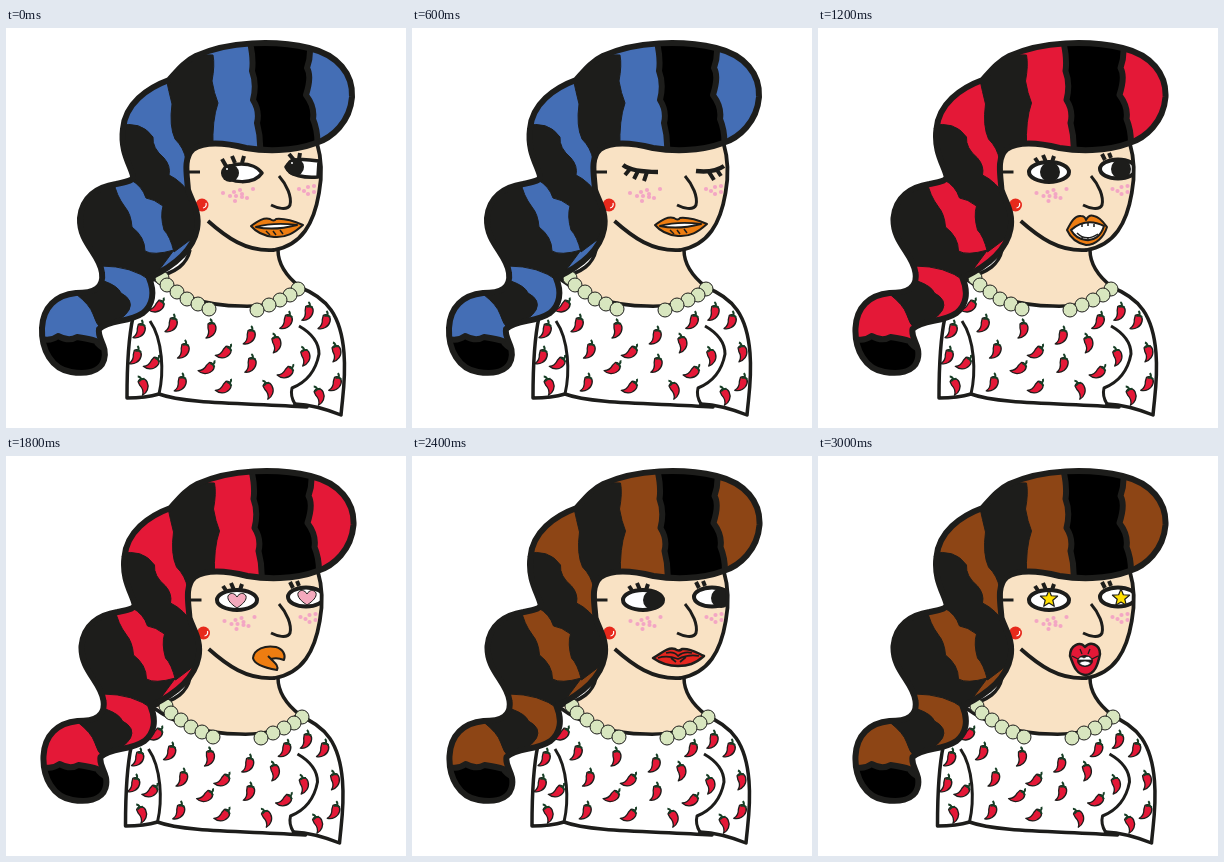
These frames come from a looping animation (400x400 px, 3600 ms). An HTML page:

```html
<!DOCTYPE html>
<html lang="en">
<head>
<meta charset="utf-8">
<title>Chili girl</title>
<style>
  html, body { margin: 0; width: 100%; height: 100%; overflow: hidden; background: #fff; }
  svg { display: block; width: 400px; height: 400px; }
</style>
</head>
<body>
<svg id="stage" viewBox="0 0 400 400"></svg>
<script>
const INK = '#1d1d1b', SKIN = '#f9e2c4', RED = '#e41837', ORANGE = '#ee7d11';
const BLUE = '#446eb5', BROWN = '#8d4515';

const path = (d, fill = 'none', width = 3, stroke = INK) =>
  `<path d="${d}" fill="${fill}" stroke="${stroke}" stroke-width="${width}"/>`;
const oval = (x, y, rx, ry, fill, width = 0) =>
  `<ellipse cx="${x}" cy="${y}" rx="${rx}" ry="${ry}" fill="${fill}" stroke="${INK}" stroke-width="${width}"/>`;
const dots = (points, r, fill, width) => points.map(([x, y]) => oval(x, y, r, r, fill, width)).join('');
const move = (x, y, body, angle = 0) => `<g transform="translate(${x} ${y}) rotate(${angle})">${body}</g>`;

// Hair
const HAIR = `M163 52C172 42 178 34 190 28C222 13 270 12 303 20C332 27 347 46 346 69
  C344 94 326 110 310 115C286 124 258 123 240 120C220 115 199 113 187 121
  C177 130 181 147 182 162C186 174 194 184 191 201C187 223 166 239 143 250
  C149 264 147 277 137 285C122 295 104 291 93 301C91 311 102 318 98 332
  C94 345 78 346 65 344C46 341 35 322 36 300C37 279 50 267 70 265
  C88 265 98 260 96 245C94 226 73 215 74 190C76 169 91 159 110 156
  C119 154 128 153 127 148C125 138 114 124 117 101C119 76 141 60 163 52Z`;
const STRIPES = [
  'M160 50Q180 25 207 27Q209 37 206 53Q208 65 212 75Q206 92 207 120L180 132Q178 120 169 111Q163 98 166 76Q163 64 160 50Z',
  'M112 98Q135 92 147 109Q146 120 158 130Q165 138 163 147Q176 153 188 171L200 200L168 224Q164 208 158 202Q154 188 157 178Q148 171 140 170Q136 158 125 152Z',
  'M70 160L108 154Q110 167 119 179Q125 186 126 199Q139 209 139 223Q147 228 168 222L145 253Q126 238 95 238L65 210Z',
  'M70 266Q86 262 98 253Q112 258 115 265Q128 272 123 282Q118 291 96 302Q90 296 87 286Q84 277 70 266Z'
];
const BLACKS = [
  'M243 10Q248 30 246 43Q251 56 247 72Q254 83 251 95Q255 110 254 125L311 125Q313 105 307 91Q309 79 300 67Q306 48 301 40Q306 26 303 10Z',
  'M30 309Q43 315 52 308Q63 314 71 309Q84 311 90 313Q92 318 104 324L100 350L30 350Z'
];
const hair = color => path(HAIR, color, 0) +
  `<g clip-path="url(#hair)">${STRIPES.map(d => path(d, INK, 1)).join('')}${BLACKS.map(d => path(d, '#000', 6)).join('')}</g>` +
  path(HAIR, 'none', 6);

// Body
const FACE = 'M182 110L311 115C317 135 315 149 313 165C308 195 296 217 268 222C240 224 220 210 203 194L182 185Z';
const BODY = `M180 110L311 112C317 140 315 155 311 174C304 203 291 220 271 223
  C272 236 280 248 294 259C276 286 186 286 150 250C172 244 181 236 184 222Z`;
const SHIRT = `M148 251C128 264 121 300 121 370Q140 370 153 366C180 376 240 375 301 379L289 376
  Q310 377 335 387C337 365 340 350 338 325C335 288 322 270 293 259C277 275 258 279 235 278C198 278 171 268 148 251Z`;

const chili = path('M-3-5C0-8 5-6 5-1C5 5 0 9-5 9C-2 6-2 2-3-1Z', RED, 1.3) +
  path('M-2-5L1-6L4-5M1-6Q1-9-1-10', 'none', 2, '#173e25');
const CHILIS = [
  [152, 278, 40], [134, 302, 14], [166, 296, 14], [205, 301, 0], [281, 293, 16], [302, 284, 8],
  [319, 293, 14], [178, 322, 10], [130, 328, 14], [147, 335, 42], [202, 340, 46], [219, 324, 42],
  [244, 308, 12], [270, 315, -14], [299, 328, -16], [330, 324, -12], [281, 344, 44], [245, 336, 8],
  [262, 361, -28], [219, 359, 42], [175, 355, 12], [137, 357, -26], [313, 367, -26], [330, 355, 16]
];
const shirt = path(SHIRT, '#fff', 3.5) + CHILIS.map(([x, y, a]) => move(x, y, chili, a)).join('') +
  path('M144 293C157 312 158 345 153 366M293 298C307 306 313 316 313 326C310 342 301 354 286 360Q284 368 289 376');
const beads = dots([[156, 250], [161, 257], [171, 264], [181, 271], [192, 276], [203, 281],
  [292, 261], [284, 267], [274, 272], [263, 277], [251, 282]], 7, '#d8e6bf', 1);
const cheeks = dots([[217, 165], [228, 164], [234, 162], [247, 161], [224, 168], [230, 168], [236, 166],
  [241, 170], [229, 173], [236, 169], [293, 161], [298, 163], [302, 159], [308, 158], [302, 166], [308, 164]], 2.1, '#f3a6c4');
const earring = oval(196, 177, 6.5, 6.5, '#e7291c') + path('M197 180Q201 179 200 175', 'none', 1.2, '#fff');

// Eyes
const LASHES = 'M221 136L217 130M228 134L225 127M234 134L236 128M287 132L284 126M293 130L291 125';
const openEyes = (left, right) => path(LASHES, 'none', 4) +
  `<g clip-path="url(#face)">${oval(231, 144, 20, 10, '#fff', 4)}${oval(300, 141, 18, 9.5, '#fff', 4)}</g>` +
  left + right;
const pupil = (x, y, r = 9) => oval(x, y, r, r, INK);
const heart = (x, y) => move(x, y, path('M0 8C-6 4-10 0-9-4C-7-8-2-7 0-3C2-7 7-8 9-4C10 0 6 4 0 8Z', '#f4a9bd', 1));
const star = (x, y) => {
  const corners = Array.from({ length: 10 }, (_, i) => {
    const a = i * Math.PI / 5 - Math.PI / 2, r = i % 2 ? 4 : 9;
    return `${r * Math.cos(a)} ${r * Math.sin(a)}`;
  });
  return move(x, y, path(`M${corners.join('L')}Z`, '#ffdf00', 1.2));
};
const sideEyes = path('M220 138L216 131M229 135L226 128M236 135L238 128M288 132L283 126M293 131L294 125', 'none', 4) +
  path('M217 145C222 133 248 133 256 145C248 157 223 156 217 145Z', '#fff', 3.5) +
  path('M280 139C286 129 300 131 313 133L312 149C299 150 284 148 280 139Z', '#fff', 3.5) +
  pupil(224, 145) + pupil(289, 139) + oval(221, 141, 1, 1, '#fff') + oval(286, 135, 1, 1, '#fff');
const shutEyes = path('M211 137Q220 144 246 144M284 143Q302 145 312 138', 'none', 4.5) +
  path('M218 141L213 147M226 143L222 151M235 144L232 153M297 144L302 152M305 142L309 148', 'none', 4);

// Mouths
const restingMouth = path('M245 198C252 193 258 189 264 191Q268 194 270 191C280 190 290 194 297 197C288 205 280 210 268 209C258 208 250 204 245 198Z', ORANGE, 2) +
  path('M250 199Q268 194 291 197Q268 203 250 199Z', '#fff', 2) + path('M260 203L264 207M267 203L270 207M274 202L277 206', 'none', 1.5);
const smile = path('M249 202C253 194 257 187 263 188Q267 188 268 192Q271 186 276 188C282 189 286 195 289 199C286 209 278 217 268 217C258 215 252 209 249 202Z', ORANGE, 2) +
  path('M253 202Q268 189 286 198C283 208 276 213 268 212Q258 211 253 202Z', '#fff', 2) +
  path('M259 205Q268 214 280 206M264 196V199M270 195V198M276 196V199M264 209V211M270 210V212', 'none', 1.5);
const smirk = path('M247 202C248 193 259 189 270 191C277 193 280 199 278 204Q271 201 265 203C269 207 273 210 271 214C260 212 248 208 247 202Z', ORANGE, 2) +
  path('M265 203L262 200', 'none', 2);
const redLips = path('M241 202C250 197 255 191 263 193Q267 196 270 193C279 192 285 197 292 200C283 208 276 210 266 210C255 210 248 207 241 202Z', '#e6261f', 2.5) +
  path('M246 202Q255 199 266 203Q276 198 287 200M259 202L264 206M274 201L268 206M254 197Q262 195 266 200Q272 195 280 197', 'none', 1.7);
const kiss = path('M252 200C252 189 262 185 267 191C272 185 282 188 282 198C280 208 277 219 267 219C257 218 255 207 252 200Z', RED, 2.5) +
  oval(267, 205, 8, 6, INK) + path('M260 204Q262 199 266 202Q271 198 274 204ZM261 207Q267 203 273 207Q267 213 261 207Z', '#fff', .7) +
  path('M254 200L260 203M280 200L274 203M262 193L264 198M272 193L270 198', 'none', 1.3);

const openStare = openEyes(pupil(232, 144, 10), pupil(303, 141, 10));
const hearts = openEyes(heart(231, 144), heart(301, 141));
const sideways = openEyes(pupil(241, 144, 10), `<g clip-path="url(#face)">${pupil(309, 142, 10)}</g>`);
const stars = openEyes(star(231, 143), star(303, 142));

// Horizontal drift: hair and face, shirt, beads
const LOOKS = [
  { color: BLUE, eyes: sideEyes, mouth: restingMouth, drift: [0, 0, 0] },
  { color: BLUE, eyes: shutEyes, mouth: move(-2, -1, restingMouth), drift: [1, 0, 2] },
  { color: RED, eyes: openStare, mouth: smile, drift: [1.5, 0, 1] },
  { color: RED, eyes: hearts, mouth: smirk, drift: [1.5, -1.5, 4] },
  { color: BROWN, eyes: sideways, mouth: redLips, drift: [1.5, -1, 4] },
  { color: BROWN, eyes: stars, mouth: kiss, drift: [1.5, -1.5, 3] }
];

const draw = ({ color, eyes, mouth, drift: [head, top, necklace] }) => `
  <defs><clipPath id="hair"><path d="${HAIR}"/></clipPath><clipPath id="face"><path d="${FACE}"/></clipPath></defs>
  <g stroke-linejoin="round">
  ${path(BODY, SKIN, 0)}
  ${path('M184 222C181 236 171 244 148 250M272 222C272 236 280 248 294 259', 'none', 3.5)}
  ${move(top, 0, shirt)}${move(necklace, 0, beads)}
  ${move(head, 0, cheeks)}${eyes}
  ${move(head / 2, 0, path('M202 193C220 209 240 224 268 222C296 217 308 195 313 165C316 149 316 132 311 115', 'none', 3.8))}
  ${path('M273 148C281 157 286 169 284 177C281 183 271 180 265 177')}
  ${mouth}
  ${move(head, 0, earring + hair(color) + path('M183 144H194'))}
  </g>`;

const stage = document.getElementById('stage');
const pictures = LOOKS.map(draw);
let shown = -1;
function tick() {
  const step = Math.floor(performance.now() % 3600 / 600);
  if (step !== shown) stage.innerHTML = pictures[shown = step];
  requestAnimationFrame(tick);
}
tick();
</script>
</body>
</html>
```
